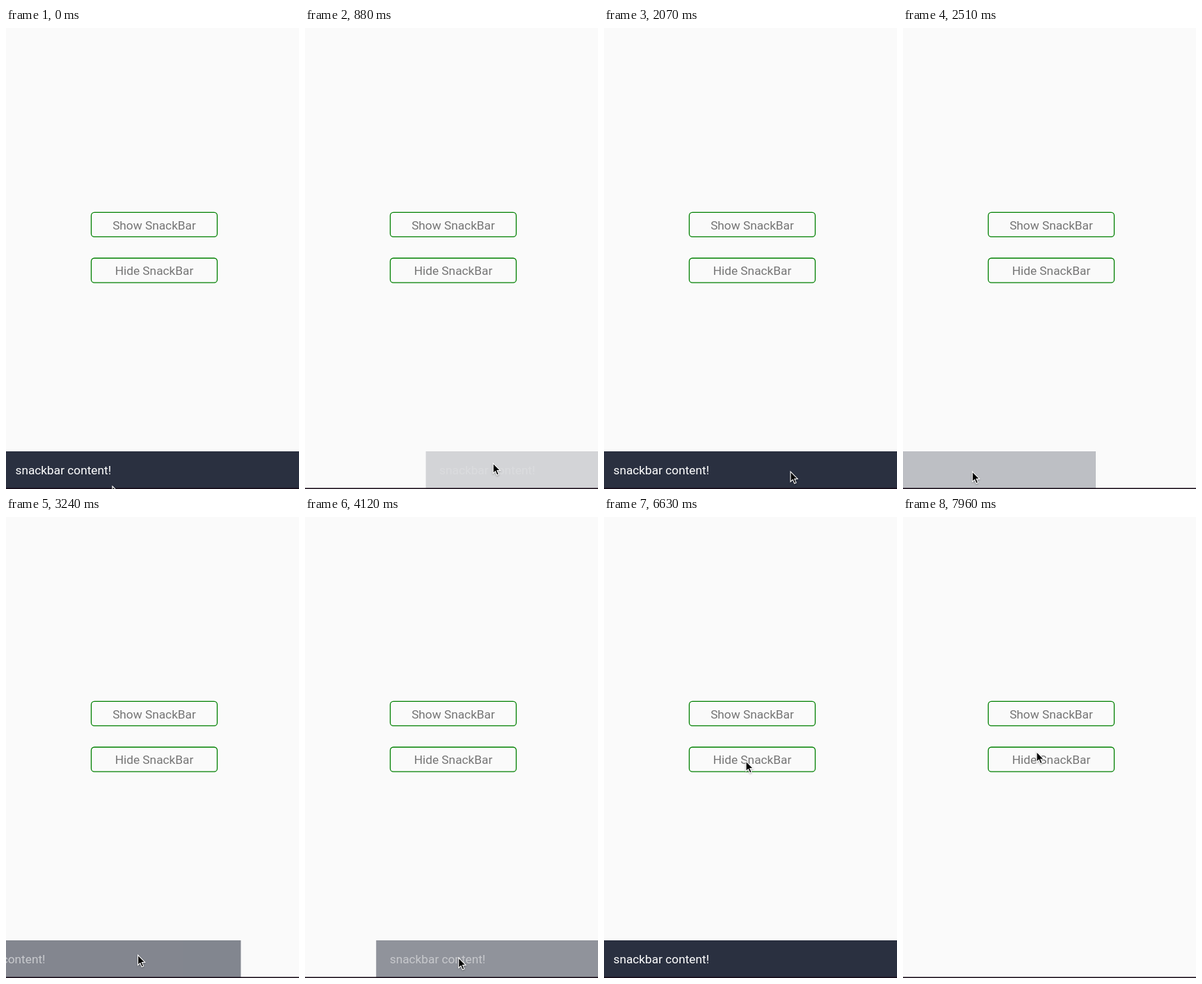
An HTML page that plays this animation: 421 px wide and 661 px high, repeating every 8000 ms.

```html
<!DOCTYPE html>
<html lang="en">
<head>
<meta charset="utf-8">
<title>Snackbar demo</title>
<style>
  html, body { margin: 0; width: 100%; height: 100%; overflow: hidden; background: #fafafa; }
  svg { display: block; }
  text { font: 17.25px Roboto, sans-serif; }
  .button rect { fill: none; stroke: green; stroke-width: 1.3; }
  .button text { fill: #757575; text-anchor: middle; }
  #cursor { filter: drop-shadow(0 1px 1px rgba(0, 0, 0, .3)); }
</style>
</head>
<body>
<svg width="421" height="661" viewBox="0 0 421 661">
  <g class="button">
    <rect x="122.5" y="264.4" width="181" height="35" rx="4.5"/>
    <text x="213" y="288.8">Show SnackBar</text>
  </g>
  <g class="button">
    <rect x="122.5" y="330" width="181" height="35.2" rx="4.5"/>
    <text x="213" y="354.2">Hide SnackBar</text>
  </g>
  <g id="bar">
    <rect x="-6" y="607" width="438" height="53" fill="#2a3040"/>
    <text id="label" x="13.5" y="640" fill="#fff">snackbar content!</text>
  </g>
  <rect y="659.5" width="421" height="1.5" fill="#140814"/>
  <path id="cursor" d="M0 0V14.5L3.3 11.6L5.6 17L8.1 15.9L5.8 10.6L10.2 10.4Z"
        fill="#000" stroke="#fff" stroke-width="1.1"/>
</svg>
<script>
const LOOP = 8000, STEP = 147.4;  // ms
const HALF = 219;                 // swipe distance at which the bar has faded out
const LAG = 0.3;                  // steps the bar trails the pointer

const ramp = (n, a, b) => Math.min(1, Math.max(0, (n - a) / (b - a)));
const arc = (n, a, b) => Math.sin(Math.PI * ramp(n, a, b));
const line = (n, a, b, x1, y1, x2, y2) => {
  const p = ramp(n, a, b);
  return [x1 + (x2 - x1) * p, y1 + (y2 - y1) * p];
};

// Pointer position at step n
function pointer(n) {
  if (n <= 3) return line(n, 0, 2, 153, 657, 94, 611);
  if (n < 12) return [78 + 222 * arc(n, 3, 12), 624];                             // swipe right and back
  if (n < 14) return line(n, 12, 14, 78, 624, 268, 636);
  if (n < 23.2) return [268 - 197 * arc(n, 14, 23.2), 636 - 8 * ramp(n, 17, 22)]; // swipe left and back
  if (n < 26) return line(n, 23.2, 26, 268, 628, 92, 632);
  if (n < 32) return [92 + 317 * ramp(n, 26, 30) ** 1.3, 632 - 18 * ramp(n, 28, 30)]; // flick away
  if (n < 40) return line(n, 32, 38, 409, 614, 200, 280);                         // to "Show"
  if (n < 49) return line(n, 41, 45, 200, 280, 204, 350);                         // to "Hide"
  return [204 - 12 * ramp(n, 49, 54), 350 - 69 * arc(n, 49, 54.33)];
}

// Press step, release step, grab point
const drags = [[3, 12, 78], [14, 23.2, 266], [26, 31, 88]];

function swipe(n) {
  const drag = drags.find(([press, release]) => n > press && n < release);
  return drag ? pointer(n - LAG)[0] - drag[2] : 0;
}

function hidden(n) {
  if (n < 31) return 0;
  return n < 46 ? 1 - ramp(n, 39, 42) : ramp(n, 46, 48);
}

const [bar, label, cursor] = ["bar", "label", "cursor"].map(id => document.getElementById(id));
const move = (el, x, y) => el.setAttribute("transform", `translate(${x} ${y})`);

function draw(time) {
  const n = Math.floor((time % LOOP + 12) / STEP);
  const x = swipe(n), fade = Math.max(0, 1 - Math.abs(x) / HALF);
  move(bar, x, 54 * hidden(n));
  bar.setAttribute("opacity", fade);
  label.setAttribute("opacity", fade);
  move(cursor, ...pointer(n));
}

let start;
function tick(now) {
  start ??= now;
  draw(now - start);
  requestAnimationFrame(tick);
}
draw(0);
requestAnimationFrame(tick);
</script>
</body>
</html>
```
